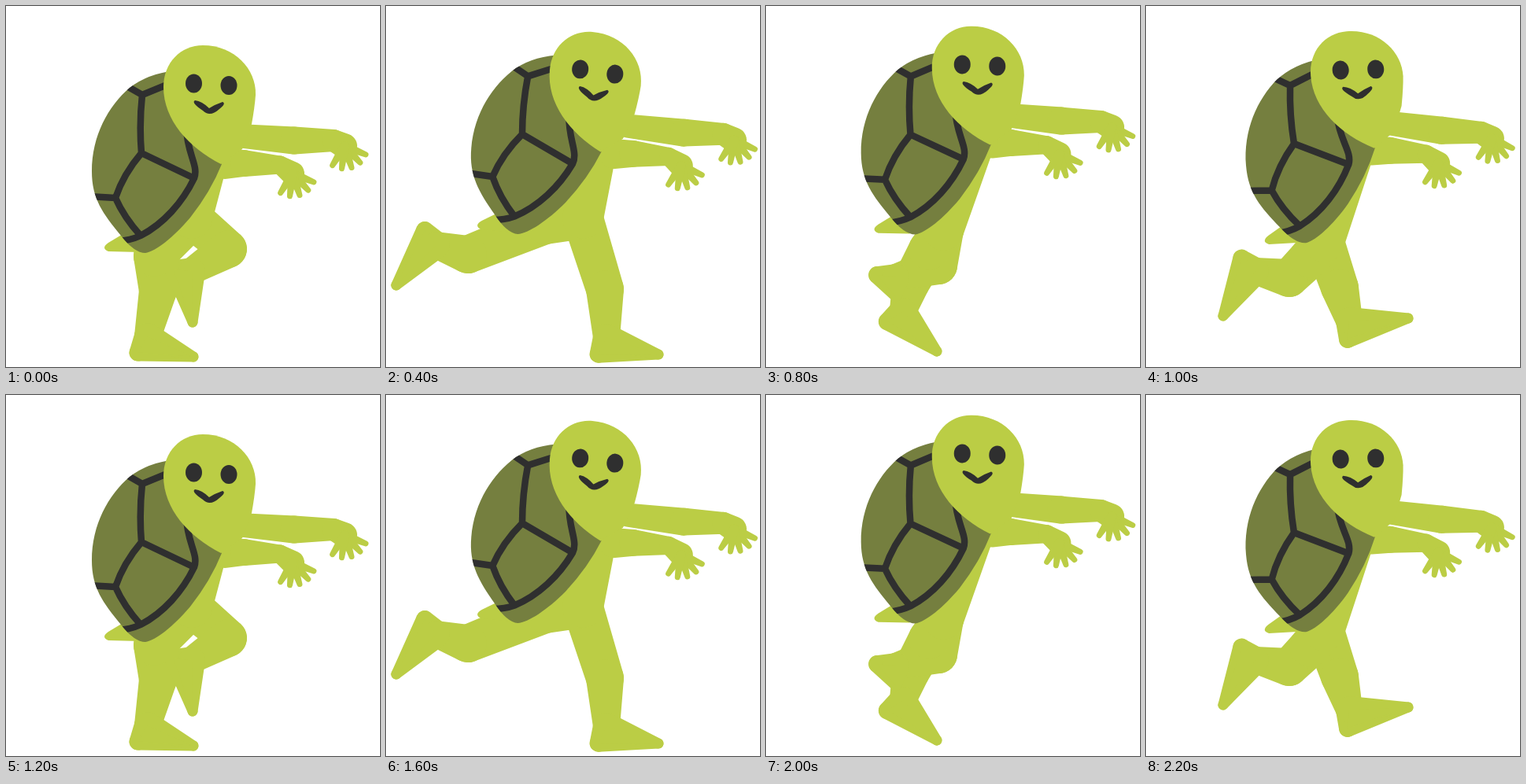
Recreate the animation shown at these times as an HTML page with a canvas. Size 475 by 459 pixels, loop 2.4 s.

```html
<!DOCTYPE html>
<html lang="en">
<head>
<meta charset="utf-8">
<title>Running turtle</title>
<style>
html, body { margin: 0; width: 100%; height: 100%; overflow: hidden; background: #fff; }
canvas { display: block; }
</style>
</head>
<body>
<canvas width="475" height="459"></canvas>
<script>
const STEP = 200;
const SKIN = '#bbcd45', SHELL = '#757f3f', DARK = '#2f2f2f';
const RAD = Math.PI / 180;
const ctx = document.querySelector('canvas').getContext('2d');

// trunk and arms: [dx, dy, degrees]; legs: hip, knee, ankle, toe
const poses = [
  { trunk: [0, 0, 0], arms: [0, 0, 0],
    front: [[236, 270], [282, 309], [236, 337], [237, 402]],
    back: [[188, 318], [193, 362], [180, 420], [238, 446]] },
  { trunk: [1, -20, 2.5], arms: [7, -14, 1],
    front: [[240, 270], [294, 318], [285, 380], [350, 403]],
    back: [[190, 300], [160, 345], [88, 408], [102, 452]] },
  { trunk: [1, -24, 4.8], arms: [12, -12, 2],
    front: [[250, 270], [278, 360], [280, 421], [346, 443]],
    back: [[202, 277], [104, 316], [64, 304], [13, 355]] },
  { trunk: [13, 1, -3.7], arms: [16, 0, 0],
    front: [[252, 276], [300, 332], [286, 386], [352, 408]],
    back: [[205, 305], [170, 344], [129, 333], [78, 381]] },
  { trunk: [11.5, -23.5, -.5], arms: [9, -26, 1],
    front: [[225, 285], [219, 330], [165, 345], [165, 370]],
    back: [[207, 310], [184, 352], [174, 388], [217, 439]] },
  { trunk: [16, -12, -4.6], arms: [9, -16, 3],
    front: [[226, 300], [246, 358], [258, 400], [333, 397]],
    back: [[208, 320], [182, 346], [139, 337], [98, 394]] }
];

const dome = new Path2D(`M215 82 Q180 86 157 104 C130 127 109 165 109 210
  C109 245 123 264 146 292 Q163 314 177 314 C190 312 213 294 234 269
  Q260 236 274 201 L240 120Z`);
const seams = new Path2D(`M152 101 L173 113 L207 99 M173 113 Q169 150 172 187
  L239 219 M172 187 Q149 214 139 244 L106 242 M139 244 Q150 269 171 292
  M142 299 Q158 298 171 292 C200 277 224 250 239 219 C245 203 230 188 229 155`);
const head = new Path2D(`M250 50 C290 50 318 80 317 113 Q316 128 312 150
  L300 182 L273 201 C232 180 200 145 200 103 C200 72 222 50 250 50Z`);
const tail = new Path2D('M160 283 L130 301 Q120 308 130 312 L170 313Z');
const smile = new Path2D(`M240 120 Q249 121 258 130 Q266 125 275 122
  Q280 124 271 131 Q259 142 250 133 C241 127 236 122 240 120Z`);

function fill(path, color) {
  ctx.fillStyle = color;
  ctx.fill(path);
}

// Run paint in a frame that is shifted, and turned about a pivot
function moved([dx, dy, turn], [px, py], paint) {
  ctx.save();
  ctx.translate(px + dx, py + dy);
  ctx.rotate(turn * RAD);
  ctx.translate(-px, -py);
  paint();
  ctx.restore();
}

// Tapered segments through points, each with its radius
function limb(points, radii) {
  ctx.fillStyle = SKIN;
  for (let i = 1; i < points.length; i++) {
    const [x, y] = points[i - 1], [u, v] = points[i];
    const a = Math.atan2(v - y, u - x);
    const b = Math.acos((radii[i - 1] - radii[i]) / Math.hypot(u - x, v - y));
    ctx.beginPath();
    ctx.arc(x, y, radii[i - 1], a + b, a - b + 2 * Math.PI);
    ctx.arc(u, v, radii[i], a - b, a + b);
    ctx.fill();
  }
}

function polar([x, y], degrees, length) {
  return [x + length * Math.cos(degrees * RAD), y + length * Math.sin(degrees * RAD)];
}

function leg([hip, knee, ankle, toe]) {
  // The heel sits square to the line from ankle to toe
  const slope = Math.atan2(toe[1] - ankle[1], toe[0] - ankle[0]) / RAD;
  const heel = polar(ankle, slope + 97, 24);
  limb([hip, knee, ankle, heel, toe, ankle], [26, 24, 17, 11, 6.5, 17]);
  ctx.beginPath();
  for (const p of [ankle, heel, toe]) ctx.lineTo(...p);
  ctx.fill();
}

function arm(joints, radii) {
  limb(joints, radii);
  const palm = joints[joints.length - 1];
  for (let i = 0; i < 5; i++) limb([palm, polar(palm, 22 + 25 * i, 29)], [6, 3.5]);
}

function arms() {
  arm([[295, 165], [366, 171], [416, 171], [430, 178]], [15, 17.5, 14, 16]);
  arm([[278, 201], [302, 200], [348, 202], [364, 213]], [19, 17, 11.5, 15]);
}

function trunk() {
  fill(tail, SKIN);
  fill(dome, SHELL);
  ctx.save();
  ctx.clip(dome);
  ctx.strokeStyle = DARK;
  ctx.lineWidth = 8.5;
  ctx.lineJoin = 'round';
  ctx.stroke(seams);
  ctx.restore();
  fill(head, SKIN);
  fill(smile, DARK);
  for (const [x, y] of [[238.5, 98.5], [283, 101]]) {
    ctx.beginPath();
    ctx.ellipse(x, y, 10.5, 12, 0, 0, 2 * Math.PI);
    ctx.fill();
  }
}

function draw() {
  const pose = poses[Math.floor(performance.now() / STEP) % poses.length];
  const pivot = [172, 187];
  ctx.clearRect(0, 0, 475, 459);
  leg(pose.back);
  leg(pose.front);
  limb([pose.back[0], pose.front[0]], [26, 26]);
  const [dx, dy] = pose.arms;
  limb([[258 + dx, 210 + dy], pose.front[0]], [20, 26]);
  moved(pose.arms, [305, 180], arms);
  moved(pose.trunk, pivot, trunk);
  requestAnimationFrame(draw);
}
draw();
</script>
</body>
</html>
```
